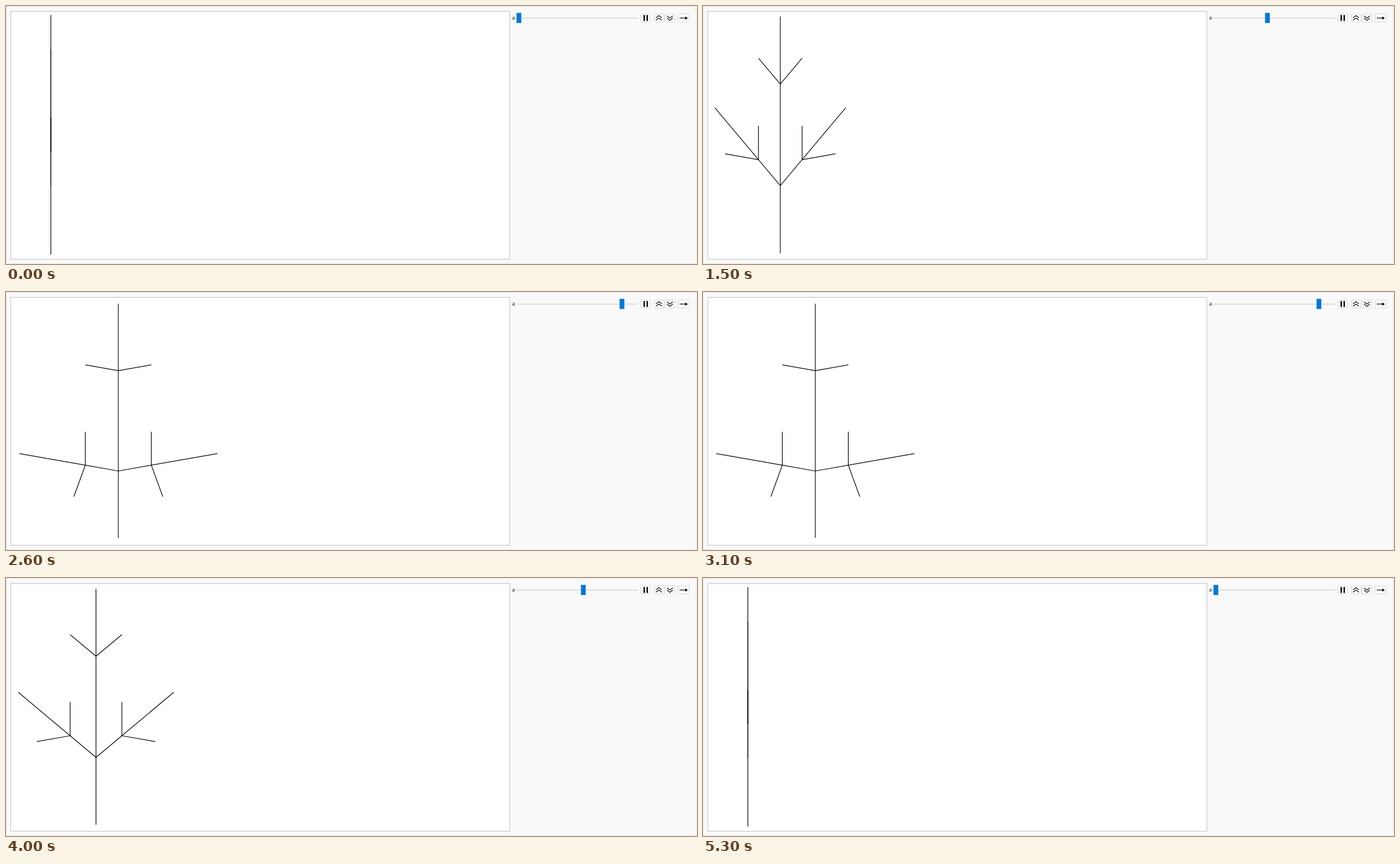
An HTML page for the animation above (6000 ms loop, 1224 px wide and 458 px high).

```html
<!DOCTYPE html>
<html lang="en">
<head>
<meta charset="utf-8">
<title>Branching angle</title>
<style>
  html, body { margin: 0; width: 100%; height: 100%; overflow: hidden; background: #fff; }
  svg { display: block; width: 1224px; height: 458px; }
  text { font: 8.8px "Open Sans", "Noto Sans", sans-serif; fill: #000; }
  .button { fill: #fff; stroke: #d2d2d2; }
  .icon { fill: none; stroke: #000; stroke-width: 1.2; }
  #tree { stroke: #000; stroke-width: 1.2; }
</style>
</head>
<body>
<svg viewBox="0 0 1224 458">
  <rect x=".5" y=".5" width="1222" height="457" fill="#f9f9f9" stroke="#e3e3e3"/>
  <rect x="8.5" y="9.5" width="884" height="440" fill="#fff" stroke="#c0c0c0"/>
  <g id="tree"></g>

  <text x="896.6" y="24.2">a</text>
  <rect x="904" y="20.5" width="215" height="2" fill="#dcdcdc"/>
  <rect id="thumb" y="12.2" width="8.4" height="18" fill="#0078d7"/>

  <g class="button">
    <rect x="1124.5" y="14" width="17" height="14.4" rx="2"/>
    <rect x="1148.5" y="14" width="17" height="14.4" rx="2"/>
    <rect x="1167.5" y="14" width="17" height="14.4" rx="2"/>
    <rect x="1190.5" y="14" width="20" height="14.4" rx="2"/>
  </g>
  <path d="M1129.3 16h2.5v10.6h-2.5zM1134.6 16h2.5v10.6h-2.5z"/>
  <path class="icon" d="M1151.3 21l5.2-4 5.2 4M1151.3 25.2l5.2-4 5.2 4"/>
  <path class="icon" d="M1170.8 17.4l5.2 4 5.2-4M1170.8 21.6l5.2 4 5.2-4"/>
  <path class="icon" d="M1193.3 21.4h11"/>
  <path d="M1203.2 18.5l4.6 2.9-4.6 2.9z"/>
</svg>
<script>
const LOOP = 6000;
const STEPS = [700, 1000, 1200, 1500, 1800, 2000, 2300, 2600, 2900,
               3100, 3400, 3700, 4000, 4200, 4500, 4800, 5000, 5300];
const PEAK = 9;
const LEFT = 16.2, MID = 228.7, HEIGHT = 430.3, PAD = 1 / 48;

const tree = document.getElementById("tree");
const thumb = document.getElementById("thumb");
const lines = Array.from({ length: 11 }, () =>
  tree.appendChild(document.createElementNS("http://www.w3.org/2000/svg", "line")));

// Segments in tree units, root at the origin, y pointing up.
function segments(a) {
  const out = [];
  const grow = (x, y, angle, length) => {
    const end = [x + length * Math.sin(angle), y + length * Math.cos(angle)];
    out.push([x, y, ...end]);
    return end;
  };
  grow(0, 0, 0, 7);
  for (const side of [-1, 1]) {
    const turn = side * a;
    const fork = grow(0, 2, turn, 1);
    grow(...fork, turn, 2);
    grow(...fork, 0, 1);
    grow(...fork, 2 * turn, 1);
    grow(0, 5, turn, 1);
  }
  return out;
}

function draw(step) {
  // The tree folds flat at both ends of the slider.
  const a = (step % PEAK) * Math.PI / 18;
  const width = a ? 6 * Math.sin(a) : 2;
  const scale = HEIGHT / (7 + 2 * PAD * width);
  const cx = LEFT + scale * width * (0.5 + PAD);
  const base = MID + 3.5 * scale;
  segments(a).forEach(([x1, y1, x2, y2], i) => {
    const line = lines[i];
    line.setAttribute("x1", cx + scale * x1);
    line.setAttribute("y1", base - scale * y1);
    line.setAttribute("x2", cx + scale * x2);
    line.setAttribute("y2", base - scale * y2);
  });
  thumb.setAttribute("x", 904.3 + 22.82 * step);
}

const start = performance.now();
let shown = -1;
function tick() {
  const t = (performance.now() - start) % LOOP;
  const passed = STEPS.filter(s => s <= t).length;
  const step = PEAK - Math.abs(PEAK - passed);
  if (step !== shown) draw(shown = step);
  requestAnimationFrame(tick);
}
tick();
</script>
</body>
</html>
```
